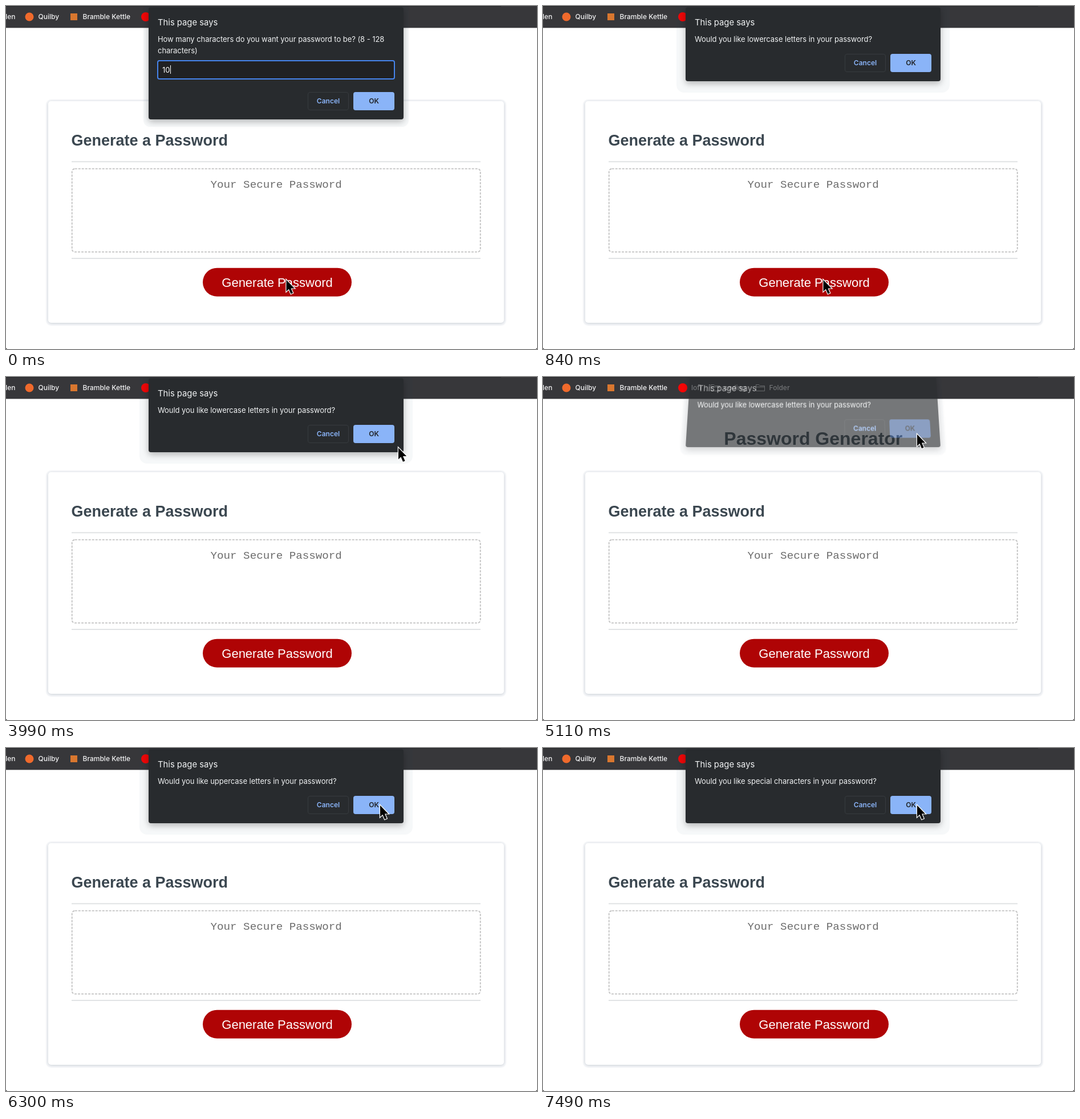
An HTML page for the animation above (8 s loop, 931 by 602 pixels).

```html
<!DOCTYPE html>
<html lang="en">
<head>
<meta charset="utf-8">
<title>Password Generator</title>
<style>
  html, body { margin: 0; width: 100%; height: 100%; overflow: hidden; background: #fff; }
  #stage { position: relative; width: 931px; height: 602px; overflow: hidden; }
  #stage > svg { position: absolute; left: 0; top: 0; }
  svg text { font-family: "Liberation Sans", Arial, sans-serif; }
  svg .bar text { font: 500 12px Inter, sans-serif; fill: #f1f1f2; }
  svg .mono { font-family: "Liberation Mono", "Courier New", monospace; }
  .card {
    position: absolute; left: 74px; top: 167px; width: 799px; height: 389px;
    border-radius: 5px; background: #fff;
    box-shadow: 0 1px 5px rgba(60, 80, 100, .25), 0 1px 0 4px rgba(60, 90, 120, .04);
  }

  #dialog {
    position: absolute; left: 250px; top: 2px; width: 447px; height: 130px;
    border-radius: 4px; background: #282b2e; color: #f1f3f4;
    font: 13px/20px Inter, sans-serif; transform-origin: 50% 100%;
    box-shadow: 0 4px 12px rgba(0, 0, 0, .28), 0 4px 0 var(--halo, 16px) rgba(20, 60, 100, .035);
  }
  #dialog.prompt { height: 197px; }
  #dialog.tight { --halo: 9px; }
  #dialog > * { position: absolute; box-sizing: border-box; }
  .head { left: 16px; top: 17px; font-size: 14.8px; }
  #message { left: 16px; top: 46px; white-space: pre; letter-spacing: -.05px; }
  .field {
    display: none; left: 15px; top: 93px; width: 417px; height: 34px; padding: 5px 7px;
    border: 2px solid #4684ec; border-radius: 4px; background: #202123; color: #fff;
  }
  .prompt .field { display: block; }
  #caret { position: absolute; left: 21px; top: 7px; width: 1px; height: 15px; background: #fff; }
  .btn {
    bottom: 16px; width: 72px; height: 32px; border-radius: 4px;
    font-size: 12px; font-weight: 600; line-height: 32px; text-align: center;
  }
  .cancel { right: 96px; border: 1px solid #373b3f; line-height: 30px; color: #8ab4f8; }
  .ok { right: 16px; background: #8ab4f8; color: #202124; }
  .pressed .ok { background: #4a6aa0; }
</style>
</head>
<body>
<div id="stage">
  <div class="card"></div>
  <svg width="931" height="602">
    <g class="bar">
      <rect width="931" height="38.4" fill="#37373a"/>
      <rect width="868" height="1" fill="#232427"/>
      <text x="16.5" y="23" text-anchor="end">den</text>
      <circle cx="41" cy="19" r="7.5" fill="#f06a2c"/>
      <text x="56.5" y="23">Quilby</text>
      <rect x="113" y="13" width="12" height="12" fill="#d9772f"/>
      <text x="134.5" y="23">Bramble Kettle</text>
      <circle cx="245" cy="19" r="8" fill="#f60505"/>
      <text x="260" y="23">lofi</text>
      <path id="folder" d="M294.5 24.5v-11h5l2 2h8v9zM294.5 17.5h15" fill="none" stroke="#d6d6d8"/>
      <text x="317" y="23">coding</text>
      <use href="#folder" x="79"/>
      <text x="396.5" y="23">Folder</text>
    </g>

    <g fill="#3b4750" font-weight="bold">
      <text x="473.8" y="119" font-size="32" text-anchor="middle">Password Generator</text>
      <text x="114.4" y="245" font-size="27">Generate a Password</text>
    </g>
    <path d="M115 273.3h717M115 443h717" stroke="#e1e3e5" stroke-width="2"/>
    <rect x="115.7" y="285.7" width="716" height="146" rx="5" fill="none"
      stroke="#c2c2c2" stroke-width="1.8" stroke-dasharray="4 2"/>
    <text class="mono" x="473.7" y="319" font-size="19.2" fill="#6c6c6c" text-anchor="middle">Your Secure Password</text>
    <rect x="345" y="459.7" width="261" height="50" rx="25" fill="#af0405"/>
    <text x="475.5" y="492.5" font-size="22" fill="#fff" text-anchor="middle">Generate Password</text>
    <path d="M0 600v2h2zM931 600v2h-2z" fill="#333"/>
  </svg>

  <div id="dialog">
    <div class="head">This page says</div>
    <div id="message"></div>
    <div class="field">10<span id="caret"></span></div>
    <div class="btn cancel">Cancel</div>
    <div class="btn ok">OK</div>
  </div>

  <svg width="931" height="602">
    <path id="cursor" d="M1 .8V21L5.4 16.8L9 25.2L12.6 23.7L9 15.4H15.2Z"
      fill="#000" stroke="#fff" stroke-width="2.4" paint-order="stroke"/>
  </svg>
</div>

<script>
const LOOP = 8000, STEP = 70, PRESS = 490, CLOSE = 350, OPEN = 140, CLOSE_TIME = 197;

// Each dialog is fully open at its time; the one before it closes first.
const ask = what => `Would you like ${what} in your password?`;
const dialogs = [
  { at: 0, text: 'How many characters do you want your password to be? (8 - 128\ncharacters)' },
  { at: 840, text: ask('lowercase letters') },
  { at: 5390, text: ask('uppercase letters') },
  { at: 7490, text: ask('special characters') }
];

// time, x, y of the pointer tip
const path = [
  [1540, 490.5, 480], [1750, 510, 420], [2030, 572, 255], [2240, 620, 135],
  [2380, 638, 86], [2450, 668, 104], [2520, 688, 121], [2590, 692, 125],
  [2730, 694, 125.5], [2800, 694, 125.5], [3080, 687, 123.5],
  [4270, 687, 123.5], [4480, 668, 110], [4690, 655, 100]
];

const $ = id => document.getElementById(id);
const dialog = $('dialog'), message = $('message'), caret = $('caret'), cursor = $('cursor');
const clamp = v => Math.max(0, Math.min(1, v));

function pointAt(t) {
  const i = path.findIndex(p => p[0] > t);
  if (i === 0) return path[0].slice(1);
  if (i < 0) return path[path.length - 1].slice(1);
  const a = path[i - 1], b = path[i], k = (t - a[0]) / (b[0] - a[0]);
  return [a[1] + (b[1] - a[1]) * k, a[2] + (b[2] - a[2]) * k];
}

function drawDialog(t) {
  let i = dialogs.length - 1;
  while (i > 0 && t < dialogs[i].at - OPEN) i--;
  const next = dialogs[i + 1], isPrompt = i === 0;
  const opened = i ? clamp((t - dialogs[i].at + OPEN) / OPEN) : 1;
  const closed = next ? clamp((t - next.at + CLOSE) / CLOSE_TIME) : 0;
  const show = Math.min(opened, 1 - closed), q = 1 - show;

  if (message.textContent !== dialogs[i].text) message.textContent = dialogs[i].text;
  dialog.classList.toggle('prompt', isPrompt);
  dialog.classList.toggle('tight', isPrompt || q > 0);
  // The prompt is sent with the keyboard, the others with a click.
  dialog.classList.toggle('pressed', !isPrompt && !!next && t >= next.at - PRESS);
  dialog.style.opacity = show;
  dialog.style.transform = q
    ? `translateY(${-25 * q}px) perspective(200px) rotateX(${9.2 * q}deg) scaleY(${1 + .09 * q})`
    : 'none';
}

function draw(now) {
  const t = Math.floor((now % LOOP) / STEP) * STEP;
  drawDialog(t);
  caret.style.visibility = t < 140 ? 'visible' : 'hidden';
  cursor.setAttribute('transform', `translate(${pointAt(t)})`);
}

const start = performance.now();
function tick() {
  draw(performance.now() - start);
  requestAnimationFrame(tick);
}
tick();
</script>
</body>
</html>
```
